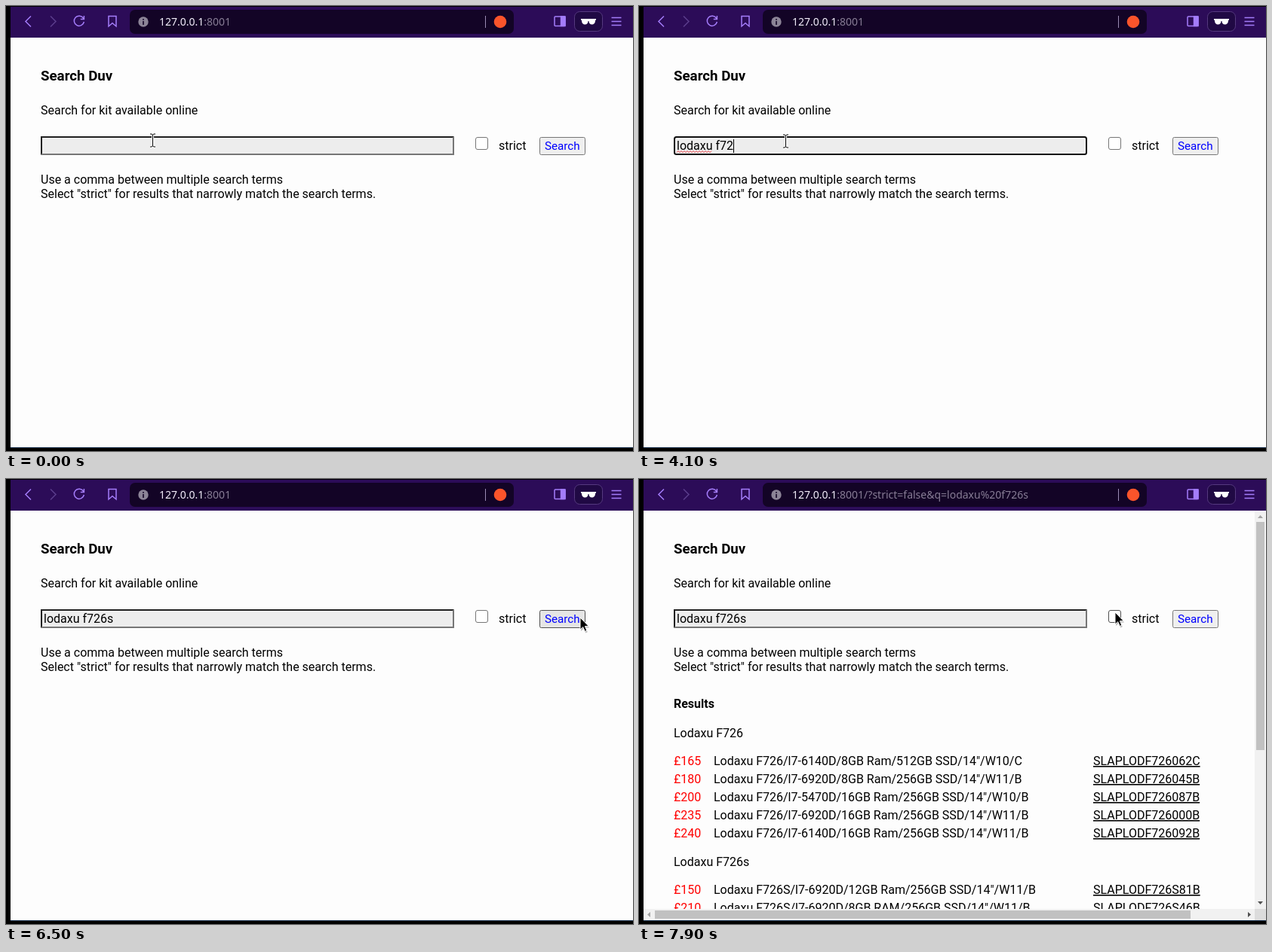
Write an HTML page that moves like this. It is 831x591 px and loops after 8000 ms.

```html
<!DOCTYPE html>
<html lang="en">
<head>
<meta charset="utf-8">
<title>Search</title>
<style>
  html, body { margin: 0; width: 100%; height: 100%; overflow: hidden; background: #000; }
  svg { display: block; width: 100%; height: 100%; }
  text { font: 16px Roboto, sans-serif; white-space: pre; }
  .bold { font-weight: 700; }
  .url { font: 14px "Noto Sans", sans-serif; fill: #f2eefa; }
  .dim { fill: #877d95; }
  .price { fill: #f00; }
  .code { text-decoration: underline; }
  .icon { fill: none; stroke: #a47dfa; stroke-width: 1.5; }
  .squiggle { fill: none; stroke: #e8343a; stroke-width: 1; }
</style>
</head>
<body>
<svg viewBox="0 0 831 591" preserveAspectRatio="none">
  <rect width="831" height="591"/>
  <rect x="6" y="1" width="825" height="41" fill="#2c0c58"/>
  <rect x="6" y="42" width="825" height="544" fill="#fdfdfd"/>
  <rect x="6" y="586" width="825" height="1" fill="#17304e"/>

  <!-- toolbar -->
  <g class="icon">
    <path d="M33 13.5 26 20.5 33 27.5"/>
    <path d="M59 13.5 66 20.5 59 27.5" stroke="#5b3d8c" style="stroke:#5b3d8c"/>
    <path d="M102.6 16.4A6.6 6.6 0 1 0 103.4 21M103.4 13V17.5H98.8"/>
    <path d="M136 13.5H146V27L141 22.8 136 27Z"/>
    <rect x="727" y="14" width="14" height="12.5" rx="1"/>
    <path d="M735.5 14H741V26.5H735.5Z" fill="#a47dfa"/>
    <path d="M802.5 15.5H815.5M802.5 20.5H815.5M802.5 25.5H815.5"/>
  </g>
  <rect x="164" y="5" width="509" height="32" rx="7" fill="#130426"/>
  <circle cx="182" cy="21" r="6.7" fill="#8c8497"/>
  <path d="M182 20V25M182 17V18.7" stroke="#130426" stroke-width="1.6"/>
  <text class="url" x="203" y="26">127.0.0.1<tspan class="dim">:8001</tspan><tspan class="dim" id="query"></tspan></text>
  <path d="M635.5 13V29" stroke="#9b8cb5"/>
  <circle cx="655" cy="21" r="8.3" fill="#fb542b"/>
  <rect x="753.5" y="7.5" width="37" height="26" rx="7" fill="#200944" stroke="#55397f"/>
  <path fill="#fff" d="M762 17h20v1.6l-1 .4c0 4-2 5.5-4.5 5.5s-4-2-4-4.5h-1c0 2.5-1.5 4.5-4 4.5s-4.5-1.5-4.5-5.5l-1-.4z"/>

  <!-- search form -->
  <text class="bold" x="46" y="99" style="font-size:18.72px">Search Duv</text>
  <text x="46" y="144">Search for kit available online</text>
  <g id="blurred">
    <rect x="46" y="173" width="548" height="25" fill="#ededed"/>
    <path d="M46 198V173H594L592 175H48V196Z" fill="#212121"/>
    <path d="M594 173V198H46L48 196H592V175Z" fill="#767676"/>
  </g>
  <rect id="focused" x="47" y="174" width="546" height="23" rx="2.5" fill="#ededed" stroke="#101010" stroke-width="2"/>
  <text id="typed" x="50" y="191"></text>
  <path id="wave1" class="squiggle"/>
  <path id="wave2" class="squiggle"/>
  <rect id="caret" y="177" width="1" height="18"/>
  <rect id="box" x="622.5" y="174.5" width="16" height="16" rx="2.5" fill="#fff"/>
  <text x="653" y="191">strict</text>
  <rect id="button" x="707.5" y="174.5" width="60" height="23" rx="2"/>
  <text x="714" y="191" fill="#00f" style="font-size:15.2px">Search</text>
  <text x="46" y="236">Use a comma between multiple search terms</text>
  <text x="46" y="255">Select "strict" for results that narrowly match the search terms.</text>

  <g id="results">
    <clipPath id="view"><rect x="6" y="42" width="810" height="529"/></clipPath>
    <g id="list" clip-path="url(#view)"></g>
    <path d="M816 42H831V571H816ZM6 571H816V586H6Z" fill="#f1f1f1"/>
    <rect x="816" y="571" width="15" height="15" fill="#dcdcdc"/>
    <path d="M818 57H829V360H818ZM21 573H731V584H21Z" fill="#c1c1c1"/>
    <path d="M820 52H827L823.5 48ZM15 575V582L11 578.5Z" fill="#a3a3a3"/>
    <path d="M820 561H827L823.5 565ZM807 575V582L811 578.5Z" fill="#505050"/>
  </g>

  <!-- pointers -->
  <g id="beam" fill="none">
    <path id="beamShape" d="M-3.5-8.5H-1.5L0-7.5 1.5-8.5H3.5M0-7.5V7.5M-3.5 8.5H-1.5L0 7.5 1.5 8.5H3.5" stroke="#fff" stroke-width="3"/>
    <use href="#beamShape"/>
    <path d="M-3.5-8.5H-1.5L0-7.5 1.5-8.5H3.5M0-7.5V7.5M-3.5 8.5H-1.5L0 7.5 1.5 8.5H3.5" stroke="#000"/>
  </g>
  <g id="arrow">
    <path d="M1 2V18L4.8 14.6 7.2 20.4 9.8 19.3 7.4 13.6H12.3Z" fill="#000" opacity=".25"/>
    <path d="M0 0V16L3.8 12.6 6.2 18.4 8.8 17.3 6.4 11.6H11.3Z" stroke="#fff"/>
  </g>
</svg>
<script>
const LOOP = 8000, TICK = 100;
const BLUR = 6400, LOADED = 6600;
const TERM = 'lodaxu f726s';
const KEY_TIMES = [900, 1000, 1200, 1500, 1900, 2100, 2300, 2500, 3800, 4100, 4300, 4600];
const $ = id => document.getElementById(id);
const show = (id, on) => $(id).setAttribute('visibility', on ? 'visible' : 'hidden');
const set = (id, attrs) => { for (const k in attrs) $(id).setAttribute(k, attrs[k]); };

const pen = document.createElement('canvas').getContext('2d');
pen.font = '16px Roboto, sans-serif';
const textWidth = s => pen.measureText(s).width;

function addText(x, y, content, cls = '') {
  const el = document.createElementNS('http://www.w3.org/2000/svg', 'text');
  el.setAttribute('x', x);
  el.setAttribute('y', y);
  el.setAttribute('class', cls);
  el.textContent = content;
  $('list').append(el);
}

function addRows(top, model, rows) {
  rows.forEach(([price, spec, code], i) => {
    const y = top + 24 * i;
    addText(46, y, '£' + price, 'price');
    addText(99, y, `Lodaxu ${model}/${spec}`);
    addText(602, y, 'SLAPLOD' + code, 'code');
  });
}

addText(46, 304, 'Results', 'bold');
addText(46, 343, 'Lodaxu F726');
addRows(380, 'F726', [
  [165, 'l7-6140D/8GB Ram/512GB SSD/14"/W10/C', 'F726062C'],
  [180, 'l7-6920D/8GB Ram/256GB SSD/14"/W11/B', 'F72645B'],
  [200, 'l7-5470D/16GB Ram/256GB SSD/14"/W10/B', 'F72687B'],
  [235, 'l7-6920D/16GB Ram/256GB SSD/14"/W11/B', 'F72600B'],
  [240, 'l7-6140D/16GB Ram/256GB SSD/14"/W11/B', 'F72692B'],
].map(([price, spec, code]) => [price, spec, code.length < 8 ? code.replace('F726', 'F7260') : code]));
addText(46, 514, 'Lodaxu F726s');
addRows(551, 'F726S', [
  [150, 'l7-6920D/12GB Ram/256GB SSD/14"/W11/B', 'F726S81B'],
  [210, 'l7-6920D/8GB RAM/256GB SSD/14"/W11/B', 'F726S46B'],
]);

function wave(start, end) {
  let d = `M${start} 194.5`;
  for (let x = start, up = true; x + 2 <= end; x += 2, up = !up) d += up ? 'l2-2' : 'l2 2';
  return d;
}
const secondWord = 50 + textWidth('lodaxu ');
set('wave1', { d: wave(50, 50 + textWidth('lodaxu')) });
set('wave2', { d: wave(secondWord, 50 + textWidth(TERM)) });

const ease = u => u * u * (3 - 2 * u);
const mix = (a, b, u) => a + (b - a) * u;
const bend = (a, c, b, u) => mix(mix(a, c, u), mix(c, b, u), u);

function pointerAt(t) {
  if (t < 100) return [194.5, 178.5];
  if (t <= 5200) return [194.5, 179.5];
  if (t <= 6000) {
    const u = ease((t - 5200) / 800);
    return [mix(194.5, 708, u), bend(179.5, 172, 178, u)];
  }
  if (t <= 6200) {
    const u = (t - 6000) / 200;
    return [mix(708, 761, u), mix(178, 184, u)];
  }
  const u = ease(Math.min(1, Math.max(0, (t - 7000) / 900)));
  return [mix(761, 631, u), bend(184, 154, 177, u)];
}

function draw(t) {
  const focus = t >= 300 && t < BLUR;
  const text = TERM.slice(0, KEY_TIMES.filter(k => k <= t).length);
  const caretOff = (t >= 3100 && t < 3700) || (t >= 5200 && t < 5800);
  show('focused', focus);
  show('blurred', !focus);
  show('caret', focus && !caretOff);
  show('wave1', focus && t >= 2300);
  show('wave2', focus && t >= 5600);
  show('results', t >= LOADED);
  $('typed').textContent = text;
  set('caret', { x: Math.round(50 + textWidth(text)) });
  $('query').textContent = t >= LOADED ? '/?strict=false&q=' + encodeURIComponent(TERM) : '';

  const [x, y] = pointerAt(t);
  const onText = x < 594;
  const onLabel = x >= 618 && x <= 708;
  const onButton = x > 708;
  const pressed = t === BLUR;
  show('beam', onText);
  show('arrow', !onText);
  set(onText ? 'beam' : 'arrow', { transform: `translate(${x} ${y})` });
  set('box', { stroke: onLabel ? '#4f4f4f' : '#767676' });
  set('button', {
    fill: pressed ? '#f5f5f5' : onButton ? '#e5e5e5' : '#efefef',
    stroke: pressed ? '#8d8d8d' : onButton ? '#4f4f4f' : '#767676',
  });
}

const begin = performance.now();
function frame() {
  const t = (performance.now() - begin) % LOOP;
  draw(Math.floor(t / TICK) * TICK);
  requestAnimationFrame(frame);
}
draw(0);
requestAnimationFrame(frame);
</script>
</body>
</html>
```
